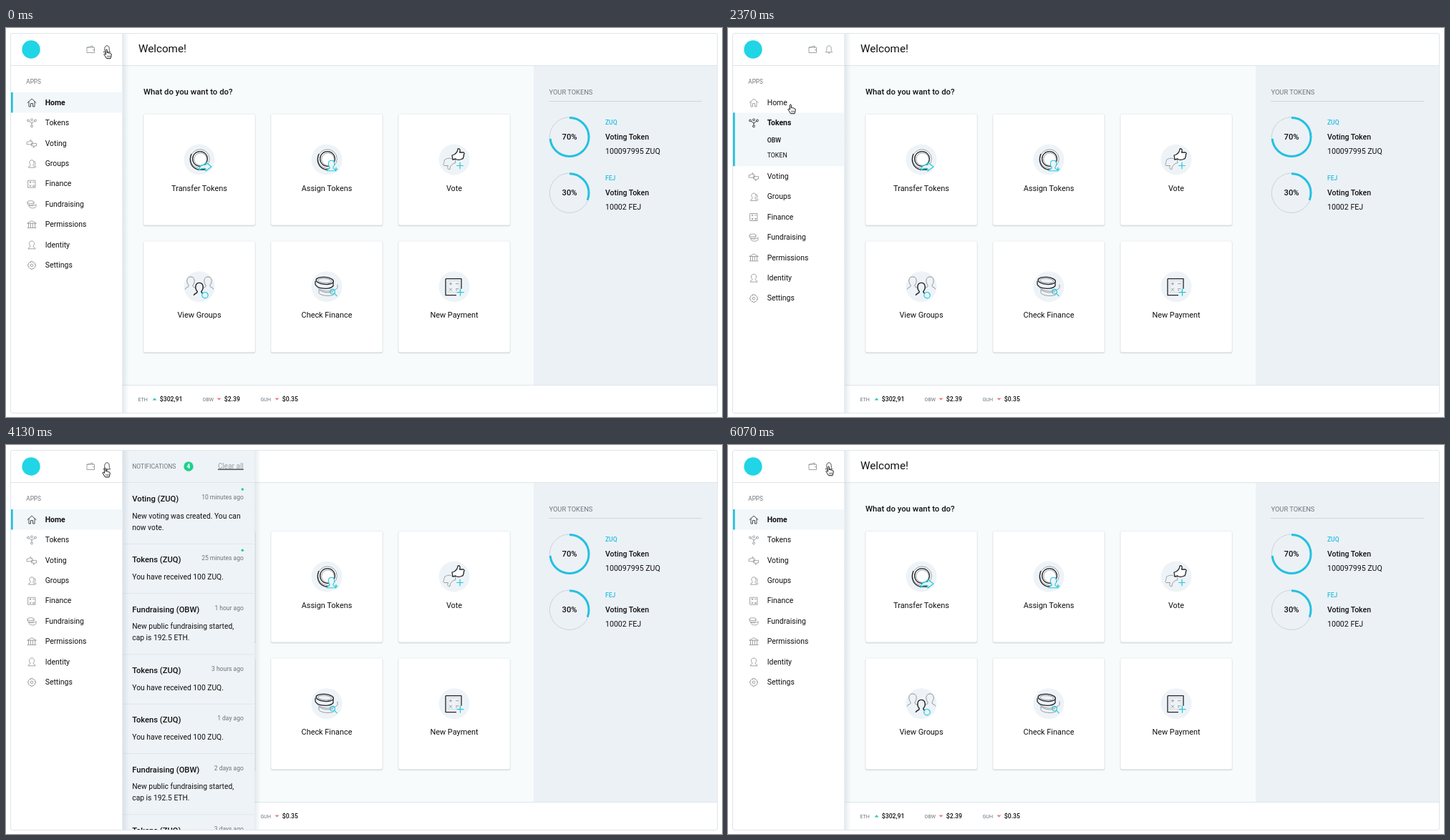
Write an HTML page that moves like this. It is 1000 px wide and 544 px high and loops after 6.11 s.

```html
<!DOCTYPE html>
<html lang="en">
<head>
<meta charset="utf-8">
<title>Dashboard</title>
<style>
  html, body { margin: 0; width: 100%; height: 100%; overflow: hidden; background: #fff; }
  svg { display: block; }
  #stage { width: 100vw; height: 100vh; }
  text { font-family: Roboto, Inter, sans-serif; fill: #111; white-space: pre; }
  .m { font-weight: 500; }
  .b { font-weight: 700; }
  .g { fill: #6d757c; }
  .c { fill: #22bfdf; }
  .line { stroke: #dfe5e9; fill: none; }
  .icon { fill: none; stroke: #8e9499; stroke-width: .85; stroke-linejoin: round; stroke-linecap: round; }
  .dark { fill: none; stroke: #22262a; stroke-width: 1.3; stroke-linejoin: round; }
  .grey { fill: none; stroke: #8d9399; stroke-width: .9; stroke-linejoin: round; }
  .cyan { fill: none; stroke: #1fcbdc; stroke-width: 1.2; stroke-linejoin: round; }
  .row .back { visibility: hidden; }
  .row.on .back { visibility: visible; }
  .row.on .name { font-weight: 700; }
  .row.on .icon, #bell.on { stroke: #2b2f33; }
</style>
</head>
<body>
<svg id="stage" viewBox="0 0 1000 544" preserveAspectRatio="none"></svg>
<script>
const LOOP = 6110;
const TOKENS_CLICK = 1170, HOME_CLICK = 2400, RING_START = 2448;
const PANEL_OPEN = 3845, PANEL_CLOSE = 5200;
const ROW = 28.42, SUBMENU = 46.3, PANEL_TRAVEL = 200;

const text = (x, y, s, size, cls = '', anchor = 'start') =>
  `<text x="${x}" y="${(y + size * .36).toFixed(2)}" font-size="${size}" class="${cls}" text-anchor="${anchor}">${s}</text>`;
const rect = (x, y, w, h, attrs) => `<rect x="${x}" y="${y}" width="${w}" height="${h}" ${attrs}/>`;
const path = (d, cls, attrs = '') => `<path d="${d}" class="${cls}" ${attrs}/>`;
const circle = (x, y, r, cls, attrs = '') => `<circle cx="${x}" cy="${y}" r="${r}" class="${cls}" ${attrs}/>`;
const at = (x, y, body, extra = '') => `<g transform="translate(${x} ${y}) ${extra}">${body}</g>`;

const PERSON = 'M-7 8c0-3 4.8-2 4.5-5C-6-1-5.5-8 0-8S6-1 2.5 3C2.2 6 7 5 7 8';
const THUMB = 'M-8 2l3-1c3-2 5-4 5-8 3-1 4 2 2.5 5H8c2 1 1 3 0 3.5 1 1 .5 2.5-.5 3 .5 1.5-.5 2.5-1.5 2.5C3 9-2 8.5-3 7l-4 1z';
const plus = (x, y, r) => path(`M${x - r} ${y}h${2 * r}M${x} ${y - r}v${2 * r}`, 'cyan');

const coin = circle(1, -1, 13.2, 'grey', 'style="fill:#fff"') + circle(1, -1, 10.4, 'dark') +
  circle(1.5, -.5, 8.8, 'grey') + path('M-11-8C-15 1-12 11-2 14H8', 'dark');

const cards = [
  ['Transfer Tokens', coin + path('M-1 15C0 9 4 7 9 7.5V4l8 6-8 6v-3.5C5 12 2 12-1 15z', 'cyan', 'style="fill:#eef3f7"')],
  ['Assign Tokens', coin + at(6.5, 8.5, path(PERSON + 'z', 'cyan', 'style="fill:#eef3f7"'), 'scale(.9)') + plus(13, 13.5, 2.8)],
  ['Vote', at(-6, 6.5, path(THUMB, 'grey'), 'rotate(180)') + at(5, -8, path(THUMB, 'dark', 'style="fill:#fff"')) + plus(8, 8.5, 4.8)],
  ['View Groups', at(-12, -5, path(PERSON, 'grey'), 'scale(1.1)') + at(12, -5, path(PERSON, 'grey'), 'scale(1.1)') +
    at(0, 3.5, path(PERSON, 'dark', 'style="fill:#eef3f7"'), 'scale(1.1)') + circle(8, 12, 4.2, 'cyan', 'style="fill:#eef3f7"')],
  ['Check Finance', path('M-11 4v5c3 4 16 5 21 2M-14-2c0 8 20 12 29 4v-5M-11 4c6 5 14 5 20 3', 'grey') +
    path('M-16-8v5C-13 3 3 5 9-1v-5', 'dark') + '<ellipse cx="-3.5" cy="-8" rx="12.2" ry="5" class="dark" transform="rotate(5)"/>' +
    '<ellipse cx="-3.5" cy="-8" rx="9.5" ry="3.2" class="grey" transform="rotate(5)"/>' +
    circle(8, 7, 3.3, 'cyan') + path('M10.5 9.5l4 4', 'cyan')],
  ['New Payment', path('M-12-11H10V3M3 12H-12V-11', 'dark') + path('M-9-8H7V8H-9z', 'grey', 'stroke-opacity=".3"') +
    path('M-7-4h4M-5-6v4M2-4h4M-7 2l4 4M-3 2l-4 4M2 3h4M2 5h2', 'grey') + plus(8.5, 8, 5)]
].map(([label, icon], i) => {
  const x = 192 + i % 3 * 178, y = 120 + (i > 2 ? 177.7 : 0);
  return rect(x - .5, y + .8, 157, 156.8, 'rx="3" fill="#d9e0e5"') +
    rect(x, y + .3, 156, 155.5, 'rx="2.5" fill="#fff" stroke="#e3e8ec" stroke-width=".7"') +
    circle(x + 78, y + 64, 21.5, '', 'fill="#eef3f7"') +
    at(x + 78, y + 64, icon) + text(x + 78, y + 103.7, label, 10.9, '', 'middle');
}).join('');

const rings = [['ZUQ', '100097995 ZUQ'], ['FEJ', '10002 FEJ']].map(([code, amount], i) => {
  const y = 152.5 + i * 78.2;
  return circle(787, y, 27.7, '', 'fill="none" stroke="#cbd2d8"') +
    circle(787, y, 27, 'arc', `pathLength="1" fill="none" stroke="#24c1e0" stroke-width="3" transform="rotate(-90 787 ${y})"`) +
    text(787, y - .3, '', 11.2, 'm percent', 'middle') +
    text(837, y - 20.5, code, 8.5, 'c m') + text(837, y - .5, 'Voting Token', 10.5, 'm') + text(837, y + 19.7, amount, 10.6);
}).join('');

const prices = [[184.5, 'ETH', '$302,91', 1], [274.5, 'OBW', '$2.39', 0], [355.5, 'GUH', '$0.35', 0]].map(([x, code, price, up]) => {
  const tip = x + 23;
  return text(x, 519, code, 7.1, 'g') +
    path(up ? `M${tip - 3} 520.5h6l-3-3.2z` : `M${tip - 3} 517.5h6l-3 3.2z`, '', `fill="${up ? '#2fc9a5' : '#e8808c'}"`) +
    text(x + 30.3, 518.7, price, 8.7, 'm');
}).join('');

const received = ['You have received 100 ZUQ.'];
const started = ['New public fundraising started,', 'cap is 192.5 ETH.'];
let noticeY = 53;
const notices = [
  ['Voting (ZUQ)', '10 minutes ago', ['New voting was created. You can', 'now vote.'], 1],
  ['Tokens (ZUQ)', '25 minutes ago', received, 1],
  ['Fundraising (OBW)', '1 hour ago', started],
  ['Tokens (ZUQ)', '3 hours ago', received],
  ['Tokens (ZUQ)', '1 day ago', received],
  ['Fundraising (OBW)', '2 days ago', started],
  ['Tokens (ZUQ)', '3 days ago', received]
].map(([title, time, lines, fresh]) => {
  const y = noticeY;
  noticeY += lines.length > 1 ? 85.3 : 69.3;
  return text(178, y + 22, title, 11.2, 'm') + text(333.5, y + 20, time, 8.5, 'g', 'end') +
    (fresh ? circle(332, y + 9, 1.8, '', 'fill="#21d08d"') : '') +
    lines.map((s, i) => text(178, y + 46 + i * 16, s, 10.3)).join('') +
    path(`M163 ${noticeY}H348`, 'line');
}).join('');

const menu = [
  ['Home', 'M-6 0L0-5.5 6 0M-4-1.5V5.5H-1.5V1h3v4.5H4V-1.5'],
  ['Tokens', 'M0 0L-4-2.5M0 0l4-2.5M0 0v3M-6.5-3.5a1.5 1.5 0 1 0 3 0a1.5 1.5 0 1 0-3 0M3.5-3.5a1.5 1.5 0 1 0 3 0a1.5 1.5 0 1 0-3 0M-1.5 4.5a1.5 1.5 0 1 0 3 0a1.5 1.5 0 1 0-3 0M-1.5-4.5a1.5 1.5 0 1 0 3 0a1.5 1.5 0 1 0-3 0'],
  ['Voting', 'M-6.5-2l3-.5L-2-5l1 .5-.5 2H1V1.5H-6.5zM0 0H6.5V3.5H4L3 6 2 5.5l.5-2H0z'],
  ['Groups', 'M-4.5 5c0-2 3-1.5 2.8-3.3C-4-1-3.5-5 0-5S4-1 1.7 1.7C1.5 3.5 4.5 3 4.5 5zM2.5-3.5C6-3.5 5.5 0 4 1.5c0 1 2 1 2 3'],
  ['Finance', 'M-5-5H5V5H-5zM-3-2.5h2M-2-3.5v2M1.5-2.5h2M-3 1.5l2 2M-1 1.5l-2 2M1.5 2h2M1.5 3.5h2'],
  ['Fundraising', 'M-6-3a4.5 2 0 1 0 9 0a4.5 2 0 1 0-9 0v2.5C-5 2 1 2 3-.5V-3M-4 1v2C-2 6 5 6 6 3V0C4 2.5-2 3-4 1'],
  ['Permissions', 'M-6-2L0-5.5 6-2zM-4.5-2v6M-1.5-2v6M1.5-2v6M4.5-2v6M-6 4.5H6'],
  ['Identity', 'M-5 5c0-2 3.2-1.5 3-3.3C-4.5-1-4-5.5 0-5.5S4.5-1 2 1.7C1.8 3.5 5 3 5 5z'],
  ['Settings', 'M-1-5.5H1L1.5-4 3-4.5 4.5-3 4-1.5 5.5-1V1L4 1.5 4.5 3 3 4.5 1.5 4 1 5.5H-1L-1.5 4-3 4.5-4.5 3-4 1.5-5.5 1V-1L-4-1.5-4.5-3-3-4.5-1.5-4zM-1.8 0a1.8 1.8 0 1 0 3.6 0a1.8 1.8 0 1 0-3.6 0']
].map(([name, d], i) => `<g class="row">
  <g class="back">${rect(7, 0, 155.5, ROW, 'class="fill" fill="#f2f7fa"')}${rect(6.5, 0, 3.2, ROW, 'class="fill" fill="#24c1e0"')}</g>
  ${at(36, 14.5, path(d, 'icon'))}${text(54.7, 14, name, 10.45, 'name')}
  ${i === 1 ? `<svg id="sub" x="7" y="${ROW}" width="155" height="0" overflow="hidden">
    ${text(47.7, 10, 'OBW', 8.8, 'm')}${text(47.7, 31.5, 'TOKEN', 8.8)}</svg>` : ''}
</g>`).join('');

const hand = path('M-2.6-5.3c0-1.6 2-1.6 2 0V-1.7C.2-2.6 1.5-2.3 1.6-1.3 2.5-1.9 3.5-1.5 3.6-.6 4.5-1 5.2-.5 5.2.5 5.2 3 4.5 4 4 6.2H-1.5C-2.5 4-4 2.5-5 .8-5.5-.5-4-1-2.6.7z',
  '', 'fill="#fff" stroke="#111" stroke-width="1" stroke-linejoin="round"') +
  path('M-.3 2v2.5M1.4 2v2.5M3 2v2.5', '', 'stroke="#111" stroke-width=".6"');

const stage = document.getElementById('stage');
stage.innerHTML = `
<defs>
  <linearGradient id="shade"><stop stop-color="#8fa3b0" stop-opacity=".22"/><stop offset="1" stop-color="#8fa3b0" stop-opacity="0"/></linearGradient>
  <clipPath id="page">${rect(163, 7.5, 830, 530.5, '')}</clipPath>
</defs>
${rect(0, 0, 1000, 544, 'fill="#fff"')}
${rect(163, 52.5, 574, 447, 'fill="#f7fbfc"')}${rect(737, 52.5, 256.5, 447, 'fill="#ecf1f6"')}
${path('M163 52.5H993.5M163 499.5H993.5', 'line')}
${text(185, 29, 'Welcome!', 15.2)}
${text(192, 89.2, 'What do you want to do?', 11.35, 'm')}
${cards}
${text(758.5, 90, 'YOUR TOKENS', 9.3, 'g')}${path('M758 102.5H972', '', 'stroke="#cfd7dd"')}
${rings}${prices}
<g clip-path="url(#page)"><g id="panel">
  ${rect(348.5, 7, 9, 532, 'fill="url(#shade)"')}${rect(140, 7, 208.5, 532, 'fill="#eef3f7"')}
  ${path('M163 52.5H348', 'line')}
  ${text(178, 30, 'NOTIFICATIONS', 8.5, 'g')}
  ${circle(256.7, 30, 6.7, '', 'fill="#21d08d"')}<text x="256.7" y="32.9" font-size="8.2" text-anchor="middle" class="b" style="fill:#fff">4</text>
  <g text-decoration="underline">${text(333.5, 29, 'Clear all', 10, '', 'end').replace('<text', '<text style="fill:#9aa3aa"')}</g>
  ${notices}
</g></g>
${rect(7, 7.5, 156, 530.5, 'fill="#fff"')}${rect(163, 7.5, 9, 530.5, 'fill="url(#shade)"')}
${path('M7 52.5H163M162.8 7.5V538', 'line')}
${circle(35, 30, 12.7, '', 'fill="#20d5e6"')}
${at(118, 30, path('M-5-2.5V4.5H5.5V-2.5zM-5-2.5L3-5V-2.5M3.5.5h2', 'icon'))}
${at(141, 30, path('M-4.5 3.5C-3 2-3.2 1-3.2-1.5-3.2-6.5 3.2-6.5 3.2-1.5 3.2 1 3 2 4.5 3.5zM-1 4.5C-1 6 1 6 1 4.5', 'icon', 'id="bell"'))}
${text(28.3, 75, 'APPS', 8.2, 'g')}
${menu}
${rect(6.5, 7.5, 987, 531, 'rx="2.5" class="line"')}
<g id="cursor">${hand}</g>`;

const byId = id => document.getElementById(id);
const rows = [...stage.querySelectorAll('.row')];
const arcs = [...stage.querySelectorAll('.arc')];
const percents = [...stage.querySelectorAll('.percent')];
const tokenFill = rows[1].querySelectorAll('.fill');

// Shown percentage and drawn share of each ring
const SHARES = [[70, .735], [30, .31]];

// Cursor stops: time, x, y
const STOPS = [[0, 142, 36.5], [220, 142, 36.5], [980, 71.5, 144], [1720, 71.5, 144], [2280, 89, 113.5],
  [2760, 89, 113.5], [3500, 140, 38.7], [4300, 140, 38.7], [4700, 142, 36.5], [LOOP, 142, 36.5]];

function cursorAt(t) {
  const i = Math.max(1, STOPS.findIndex(s => s[0] >= t));
  const [t0, x0, y0] = STOPS[i - 1], [t1, x1, y1] = STOPS[i];
  const p = (t - t0) / (t1 - t0), e = p * p * (3 - 2 * p);
  return [x0 + (x1 - x0) * e, y0 + (y1 - y0) * e];
}

// Damped spring from 0 to 1, held at its end value
function spring(ms) {
  const s = ms / 1000;
  if (s <= 0) return 0;
  return Math.min(1, 1 - Math.exp(-11 * s) * (Math.cos(8.3 * s) + 1.325 * Math.sin(8.3 * s)));
}

function render(t) {
  const unfolded = spring(t - TOKENS_CLICK) - spring(t - HOME_CLICK);
  const active = t >= TOKENS_CLICK && t < HOME_CLICK ? 1 : 0;
  rows.forEach((row, i) => {
    row.setAttribute('transform', `translate(0 ${90 + ROW * i + (i > 1 ? SUBMENU * unfolded : 0)})`);
    row.classList.toggle('on', i === active);
  });
  tokenFill.forEach(r => r.setAttribute('height', ROW + SUBMENU * unfolded));
  byId('sub').setAttribute('height', Math.max(0, SUBMENU * unfolded));

  const fill = t < HOME_CLICK ? 1 : spring(t - RING_START);
  SHARES.forEach(([percent, share], i) => {
    arcs[i].setAttribute('stroke-dasharray', `${share * fill} 2`);
    percents[i].textContent = Math.round(percent * fill) + '%';
  });

  const shown = spring(t - PANEL_OPEN) - spring(t - PANEL_CLOSE);
  byId('panel').setAttribute('transform', `translate(${-PANEL_TRAVEL * (1 - shown)} 0)`);

  const [x, y] = cursorAt(t);
  byId('cursor').setAttribute('transform', `translate(${x} ${y})`);
  byId('bell').classList.toggle('on', x > 133 && y < 44);
}

const startTime = performance.now();
function tick() {
  render((performance.now() - startTime) % LOOP);
  requestAnimationFrame(tick);
}
tick();
</script>
</body>
</html>
```
